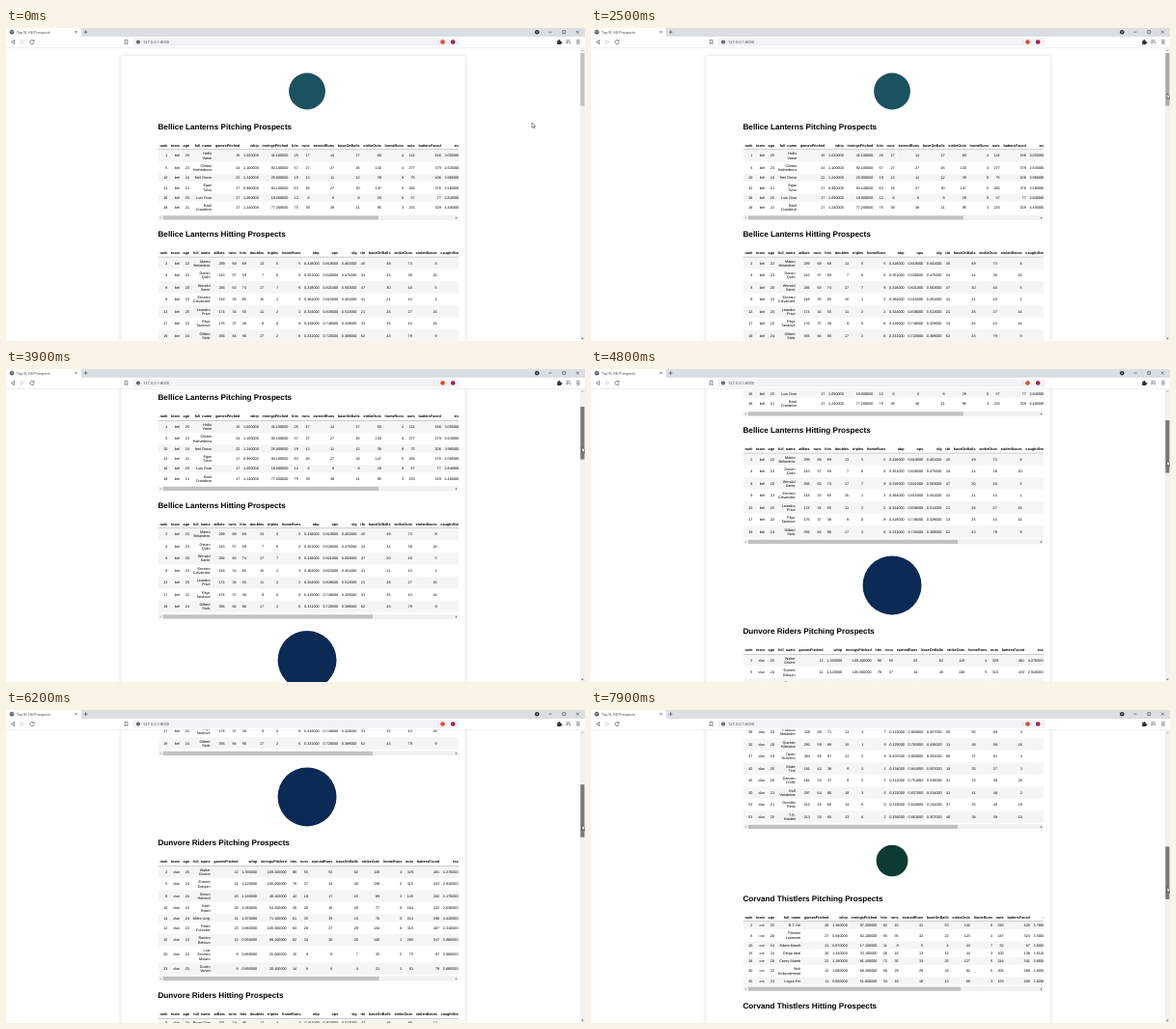
These frames come from a looping animation (600 px wide and 324 px high, 8000 ms). An HTML page:

```html
<!DOCTYPE html>
<html lang="en">
<head>
<meta charset="utf-8">
<title>Prospects</title>
<style>
  html, body { margin: 0; width: 100%; height: 100%; overflow: hidden; background: #fff; }
  #stage { position: relative; width: 600px; height: 324px; overflow: hidden; background: #fff; }
  /* The page is laid out at 1920 px wide and shown at 600. */
  #page { position: absolute; left: 0; top: 0; width: 1903px; height: 4200px; transform-origin: 0 0;
    font: 12px/14px "Liberation Sans", Arial, sans-serif; color: #000; text-rendering: geometricPrecision; }
  .sheet { position: absolute; left: 382px; top: 93px; width: 1140px; height: 4000px;
    box-shadow: 0 0 12px 1px rgba(87, 87, 87, .2); background: #fff; }
  .logo { position: absolute; border-radius: 50%; }
  h1 { position: absolute; left: 504px; margin: 0; font-size: 26px; line-height: 26px; white-space: nowrap; }
  .box { position: absolute; left: 504px; width: 997px; overflow: hidden; }
  table { border-collapse: collapse; }
  thead { border-bottom: 1px solid #a8a8a8; }
  th, td { padding: 6px; text-align: right; vertical-align: middle; white-space: nowrap; }
  tbody tr:nth-child(odd) { background: #f5f5f5; }
  .bar { position: relative; height: 17px; margin-top: 5px; background: #f1f1f1; }
  .bar i { position: absolute; left: 17px; top: 2px; height: 13px; background: #c1c1c1; }
  .bar::before, .bar::after { content: ""; position: absolute; top: 5px; border: 4px solid transparent; }
  .bar::before { left: 2px; border-right-color: #a3a3a3; }
  .bar::after { right: 2px; border-left-color: #505050; }
  svg { position: absolute; left: 0; top: 0; }
  svg text { font-family: "Open Sans", sans-serif; }
</style>
</head>
<body>
<div id="stage">
  <div id="page"><div class="sheet"></div></div>
  <svg width="600" height="324" viewBox="0 0 600 324">
    <rect width="600" height="9" fill="#dbdee3"/>
    <path d="M0 9V0H76Q78 0 78 2V9Z" fill="#fff"/>
    <rect y="9" width="600" height="11" fill="#fff"/>
    <rect y="20" width="600" height=".4" fill="#d8dade"/>
    <rect x="131.5" y="10.2" width="339" height="8.6" rx="1.3" fill="#f1f3f5"/>
    <g fill="none" stroke="#3c4043" stroke-width=".6">
      <circle cx="6" cy="4.2" r="2" fill="#5f6368"/>
      <path d="M4.2 3.6L6 4.4 7.5 3.2" stroke="#fff" stroke-width=".5"/>
      <path d="M71.3 3l2.4 2.4m0-2.4l-2.4 2.4M80.7 4.2h3.8M82.6 2.3v3.8"/>
      <path d="M562.4 4.2h3.2M576.8 2.7h2.9v2.9h-2.9zM590.8 2.7l3 3m0-3l-3 3"/>
      <path d="M8.6 12.5L5.4 14.5 8.6 16.5Z"/>
      <path d="M15.6 12.5l3.2 2-3.2 2Z" stroke="#c4c7ca"/>
      <path d="M28.7 13.3A2.1 2.1 0 1 0 29.1 15M29.1 12.3v1.6h-1.6"/>
      <path d="M123.2 12.3h2.7v4.4l-1.35-1.2-1.35 1.2Z"/>
      <path d="M580.3 12.8h4.4M580.3 14.3h3M580.3 15.8h2M584.3 14v2.5M591 12.7h3.8M591 14.4h3.8M591 16.1h3.8"/>
    </g>
    <circle cx="550.3" cy="4.2" r="2.3" fill="#303236"/>
    <path d="M549.3 3.7h2l-1 1.3z" fill="#fff"/>
    <circle cx="137" cy="14.5" r="2" fill="#50545a"/>
    <path d="M137 14.2v1.4M137 13.2v.5" stroke="#fff" stroke-width=".5"/>
    <path d="M571.2 13.3h1.3a.9 .9 0 1 1 1.5 0h1.2v1.2a.8 .8 0 1 1 0 1.3v1.1h-4z" fill="#303236"/>
    <path d="M447.5 12v5" stroke="#d5d7da" stroke-width=".4"/>
    <circle cx="452.5" cy="14.5" r="2.3" fill="#e5482d"/>
    <circle cx="463.2" cy="14.5" r="2.3" fill="#a0224f"/>
    <text x="11" y="5.5" font-size="3.6" fill="#303236">Top VL Hill Prospects</text>
    <text x="142" y="16" font-size="4" fill="#3c4043">127.0.0.1:8000</text>
    <rect x="594.7" y="20.3" width="5.3" height="304" fill="#f1f1f1"/>
    <path d="M596.1 23.8h2.5l-1.25-1.4z" fill="#a3a3a3"/>
    <path d="M596.1 320.8h2.5l-1.25 1.4z" fill="#505050"/>
    <rect id="thumb" x="595.3" width="4.1" height="54.5"/>
    <path id="pointer" d="M0 0V5.2L1.2 4.1 2 5.9 2.8 5.5 2.1 3.8H3.7Z" fill="#fff" stroke="#222" stroke-width=".5"/>
  </svg>
</div>
<script>
const SCALE = 0.3125, DURATION = 8000, STEP = 100, SCROLL_PER_PX = 5.55;
const page = document.getElementById('page');
const thumb = document.getElementById('thumb');
const pointer = document.getElementById('pointer');

// In a name, "/" breaks the line.
const tables = [
  { title: 'Bellice Lanterns Pitching Prospects', y: 102, team: 'bel', stats: pitching, nameWidth: 58, thumb: 714,
    names: 'Hollis/Varne, Clinton/Hatherbrow, Neil Drovo, Egan/Tulvo, Luis Ovar, Basil/Crandove' },
  { title: 'Bellice Lanterns Hitting Prospects', y: 213.5, team: 'bel', stats: hitting, nameWidth: 56, thumb: 695,
    names: 'Mateo/Belandrez, Dorian/Quilo, Wendol/Sarez, Ernesto/Calvandez, Leandro/Prive, Rhys/Tandove, Gilbert/Stolv' },
  { title: 'Dunvore Riders Pitching Prospects', y: 421.5, team: 'dun', stats: pitching, nameWidth: 56, thumb: 716,
    names: 'Walter/Grome, Everett/Dalquin, Simon/Halvord, Keith/Rabel, Miles Urdy, Pablo/Corvalez, Ramiro/Beltovo, Luis/Ernesto/Molaro, Dustin/Varvel' },
  { title: 'Dunvore Riders Hitting Prospects', y: 579.5, team: 'dun', stats: hitting, nameWidth: 56, thumb: 695,
    names: 'Bryan Oge, Warren/Sota, Felix/Tanlow, Ian Zoral, Marcel/Ruvo, Fabricio/Melandro, Quentin/Halewick, Owen/Dravenn, Blake/Tirol, Damian/Crolle, Rolf/Vandelow, Osvaldo/Rima, T.R./Hobbel' },
  { title: 'Corvand Thistlers Pitching Prospects', y: 835.5, team: 'cor', stats: pitching, nameWidth: 75, thumb: 705,
    names: 'B.T. Orl, Preston/Lavercott, Edwin Marolt, Diego Abal, Corey Stamb, Nick/Hollandermott, Logan Frit' },
  { title: 'Corvand Thistlers Hitting Prospects', y: 947 },
];

const logos = [
  { y: 65.5, r: 19, color: '#1b5260' },
  { y: 374, r: 30.5, color: '#0b2a55' },
  { y: 796.5, r: 16.3, color: '#0c3b33' },
];

let seed = 7;
function random(min, max) {
  seed = (seed * 16807) % 2147483647;
  return min + (max - min) * seed / 2147483647;
}
const whole = (min, max) => Math.floor(random(min, max + 1));
const share = (total, min, max) => Math.round(total * random(min, max));

function pitching() {
  const outs = whole(40, 330), innings = outs / 3;
  const hits = share(innings, .5, 1), earnedRuns = share(hits, .4, .6), baseOnBalls = share(innings, .2, .6);
  return {
    gamesPitched: whole(8, 30),
    whip: ((hits + baseOnBalls) / innings).toFixed(2) + '0000',
    inningsPitched: `${Math.floor(innings)}.${outs % 3}00000`,
    hits, runs: earnedRuns + whole(0, 4), earnedRuns, baseOnBalls,
    strikeOuts: share(innings, 1, 1.6), homeRuns: whole(0, 8), outs,
    battersFaced: outs + hits + baseOnBalls,
    era: (9 * earnedRuns / innings).toFixed(2) + '0000',
  };
}

function hitting() {
  const atBats = whole(170, 380), hits = share(atBats, .2, .33);
  const obp = random(.3, .43), slg = random(.3, .52), rate = v => v.toFixed(3) + '000';
  return {
    atBats, runs: share(atBats, .12, .25), hits, doubles: share(hits, .1, .25),
    triples: whole(0, 7), homeRuns: whole(0, 9),
    obp: rate(obp), ops: rate(obp + slg), slg: rate(slg),
    rbi: share(atBats, .1, .2), baseOnBalls: share(atBats, .08, .2),
    strikeOuts: share(atBats, .15, .25), stolenBases: whole(1, 20), caughtStealing: whole(0, 5),
  };
}

function makeRows({ team, names, stats }) {
  let rank = 0;
  return names.split(', ').map(name => ({
    rank: rank += whole(1, 5), team, age: whole(19, 25),
    full_name: name.replace(/\//g, '<br>'), ...stats(),
  }));
}

function add(tag, cls, style, html = '') {
  const el = document.createElement(tag);
  el.className = cls;
  Object.assign(el.style, style);
  el.innerHTML = html;
  page.append(el);
}

const px = v => v / SCALE + 'px';

for (const { y, r, color } of logos)
  add('div', 'logo', { left: px(312 - r), top: px(y - r), width: px(2 * r), height: px(2 * r), background: color });

for (const t of tables) {
  add('h1', '', { top: px(t.y - 4.06) }, t.title);
  if (!t.names) continue;
  const rows = makeRows(t);
  const head = Object.keys(rows[0])
    .map(h => `<th${h === 'full_name' ? ` style="min-width:${t.nameWidth}px"` : ''}>${h}</th>`).join('');
  const body = rows
    .map(row => `<tr>${Object.values(row).map(v => `<td>${v}</td>`).join('')}</tr>`).join('');
  add('div', 'box', { top: px(t.y + 15.4) },
    `<table><thead><tr>${head}</tr></thead><tbody>${body}</tbody></table>` +
    `<div class="bar"><i style="width:${t.thumb}px"></i></div>`);
}

// Keys: time, then values.
const scrollKeys = [[2500, 0], [3200, 28], [3900, 72.5], [4800, 150], [6200, 284], [6900, 410], [7900, 640.5]];
const pointerKeys = [[0, 545, 98], [500, 532, 207], [700, 532, 207], [1100, 518, 192], [1400, 518, 192], [2200, 597, 68]];

function sample(keys, t) {
  const next = keys.findIndex(k => k[0] > t);
  if (next === 0) return keys[0].slice(1);
  if (next < 0) return keys[keys.length - 1].slice(1);
  const a = keys[next - 1], b = keys[next], f = (t - a[0]) / (b[0] - a[0]);
  return a.slice(1).map((v, i) => v + (b[i + 1] - v) * f);
}

function draw(t) {
  const [scroll] = sample(scrollKeys, t);
  const [x, y] = sample(pointerKeys, t);
  const drag = scroll / SCROLL_PER_PX;
  page.style.transform = `translateY(${-scroll}px) scale(${SCALE})`;
  thumb.setAttribute('y', 26 + drag);
  thumb.setAttribute('fill', t > 2500 ? '#787878' : t >= 2200 ? '#a8a8a8' : '#c1c1c1');
  pointer.setAttribute('transform', `translate(${x} ${y + drag})`);
}

const start = performance.now();
function tick() {
  const t = (performance.now() - start) % DURATION;
  draw(Math.floor(t / STEP) * STEP);
  requestAnimationFrame(tick);
}
tick();
</script>
</body>
</html>
```
